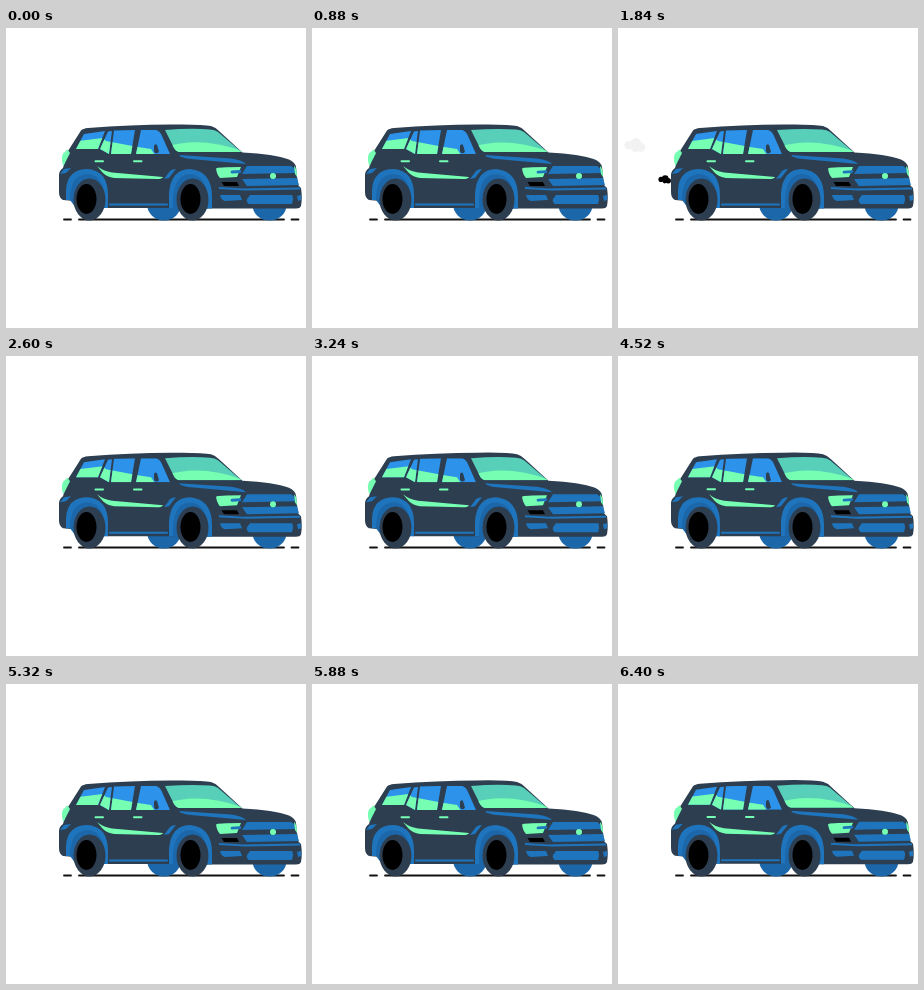
Recreate the animation shown at these times as an HTML page. Size 300 by 300 pixels, loop 6.44 s.

```html
<!DOCTYPE html>
<html lang="en">
<head>
<meta charset="utf-8">
<title>Idling car</title>
<style>
html, body { margin: 0; width: 100%; height: 100%; overflow: hidden; background: #fff; }
svg { display: block; width: 100vw; height: 100vh; }
.dark { fill: #2c3e50; }
.blue { fill: #1f75bd; }
.deep { fill: #1c67aa; }
.green { fill: #76ffb3; }
.line { fill: none; stroke-linecap: round; stroke-linejoin: round; }
</style>
</head>
<body>
<svg viewBox="0 0 300 300">
  <defs>
    <clipPath id="glass">
      <path d="M78 106L99 103L92 121H70ZM102 103.500L106 103L103 126L94 121ZM108 102.500L129 102L125 126H105ZM135 102L150 102Q154 103 156 108L164 126H130Z"/>
    </clipPath>
    <clipPath id="shield">
      <path d="M159 102Q185 100 204 101.500Q209 101.500 212 104L235.500 124L173 124Q169 123 167 118Z"/>
    </clipPath>
  </defs>

  <g id="smoke"></g>
  <path class="line" stroke="#111" stroke-width="1.800" d="M58 191.500H65M73 191.500H278M285.500 191.500H292.500"/>
  <g class="deep">
    <ellipse cx="158" cy="176" rx="17" ry="16.500"/>
    <ellipse cx="263.500" cy="177" rx="17" ry="15.500"/>
  </g>

  <g id="body">
    <path class="dark" d="M75 102.500Q77 100.500 82 100Q125 96.500 165 96.500Q196 96 205 98Q210 99.500 213 103L236.500 124.500Q268 126 283 131.500Q289 134 290 139L292 157L295 160Q296.500 170 295 178Q294 180.500 290 180.500H207L164 180H101L68 173L57 172Q53 170 53 164V147Q53 143 57 140L62 123Z"/>
    <path class="green" d="M61.500 121.500L57 125.500Q54.500 131 57.500 138L64 125Z"/>
    <path class="blue" d="M54 146L58 141L65 140L60 145Z"/>

    <g clip-path="url(#glass)">
      <path fill="#2c92ea" d="M68 100H168V128H68Z"/>
      <path class="green" d="M68 113.500L97 110L100 113L132 119L145 121L149 127V128H68Z"/>
    </g>
    <g clip-path="url(#shield)">
      <path fill="#58cfb8" d="M155 98H240V128H155Z"/>
      <path class="green" d="M160 119Q194 108 236 123V128H160Z"/>
    </g>
    <path class="dark" d="M148 118Q149 115 151 117L153 124Q149 127 148 123Z"/>
    <path class="line" stroke="#76ffb3" stroke-width="2" d="M89.500 133.200H97M128 133.200H135.500"/>
    <path class="green" d="M91 138Q97 143 106 144.500L157 149Q156 151 151 151L108 150Q101 149 97 145Z"/>
    <path class="blue" d="M173 127L225 130.500Q237 132 240 136L185 131Q175 130 173 127Z"/>
    <path class="blue" d="M158 151L164 143Q166 141 170 141L163 150Z"/>
    <path class="line" stroke="#1f75bd" stroke-width="2" d="M104 176.500H161"/>

    <path class="green" d="M210 140.500Q211 139 235 139L231 149L214 150Q211 147 210 140.500Z"/>
    <path class="line" stroke="#1f75bd" stroke-width="2.800" d="M226 144L234 143.500"/>
    <path d="M215.500 154H231L233 158H218Z"/>
    <path class="blue" d="M241 138L285 138Q289 140 290 145L236 146ZM236 151L291 150L293 157L241 158Z"/>
    <path class="green" d="M288 138Q291 140 291 149L289 146Z"/>
    <circle class="green" cx="267" cy="148" r="3"/>
    <path class="blue" d="M213 159L236 160.500L294 159.500V161.500L240 162.500L213 161ZM214 167L234 167L236 172L219 173Q215 172 214 167ZM244 167H286Q288 170 286 176H243Q240 174 241 171ZM291 168L295 167V172L292 173Z"/>

    <path class="blue" d="M60 172V162Q61 141 82 141Q102 143 102 167V180H97L66 172ZM163 180V165Q165 141 184 141Q206 143 206 169V180.500H199Z"/>
    <path class="deep" d="M64 172Q64 146 82 146Q98 147 99 173V180H70ZM167 180Q166 146 184 146Q201 147 202 173V180.500Z"/>
  </g>

  <g class="dark">
    <ellipse cx="83.500" cy="171.500" rx="16" ry="21"/>
    <ellipse cx="186.500" cy="171.500" rx="16" ry="21"/>
  </g>
  <ellipse cx="80.500" cy="171" rx="10" ry="15"/>
  <ellipse cx="184.500" cy="171" rx="10" ry="15"/>
</svg>
<script>
const LOOP = 6440;
const starts = [1130, 1340, 1550, 1760, 3400, 3610, 3820];
// age, x, y, scale, opacity
const path = [
  [0, 60, 155, .36, 1],
  [20, 54, 153, .38, 1],
  [80, 47, 151.500, .42, 1],
  [160, 30, 142, .8, .85],
  [235, 19, 128, 1, .5],
  [288, 16.500, 117.500, .73, .05],
  [340, 26, 112, .4, 0]
];
const smoke = document.getElementById("smoke");
const body = document.getElementById("body");

smoke.innerHTML = starts.map(() => `<g>
  <circle cx="-9" cy="0" r="6"/><circle cx="1" cy="-2" r="8"/>
  <circle cx="8" cy="3" r="6.500"/><circle cx="0" cy="4" r="5.500"/></g>`).join("");

function pose(age) {
  const i = path.findIndex(p => p[0] > age);
  if (i < 1) return null;
  const a = path[i - 1], b = path[i], u = (age - a[0]) / (b[0] - a[0]);
  return a.map((v, k) => v + (b[k] - v) * u);
}

function draw(now) {
  const t = now % LOOP;
  const shake = .3 * Math.sin(t / LOOP * 2 * Math.PI * 40);
  body.setAttribute("transform", `translate(0 ${shake})`);
  starts.forEach((start, i) => {
    const puff = smoke.children[i], p = pose(t - start);
    puff.setAttribute("opacity", p ? p[4] : 0);
    if (p) puff.setAttribute("transform", `translate(${p[1]} ${p[2]}) scale(${p[3]})`);
  });
}

const begin = performance.now();
function tick() {
  draw(performance.now() - begin);
  requestAnimationFrame(tick);
}
tick();
</script>
</body>
</html>
```
